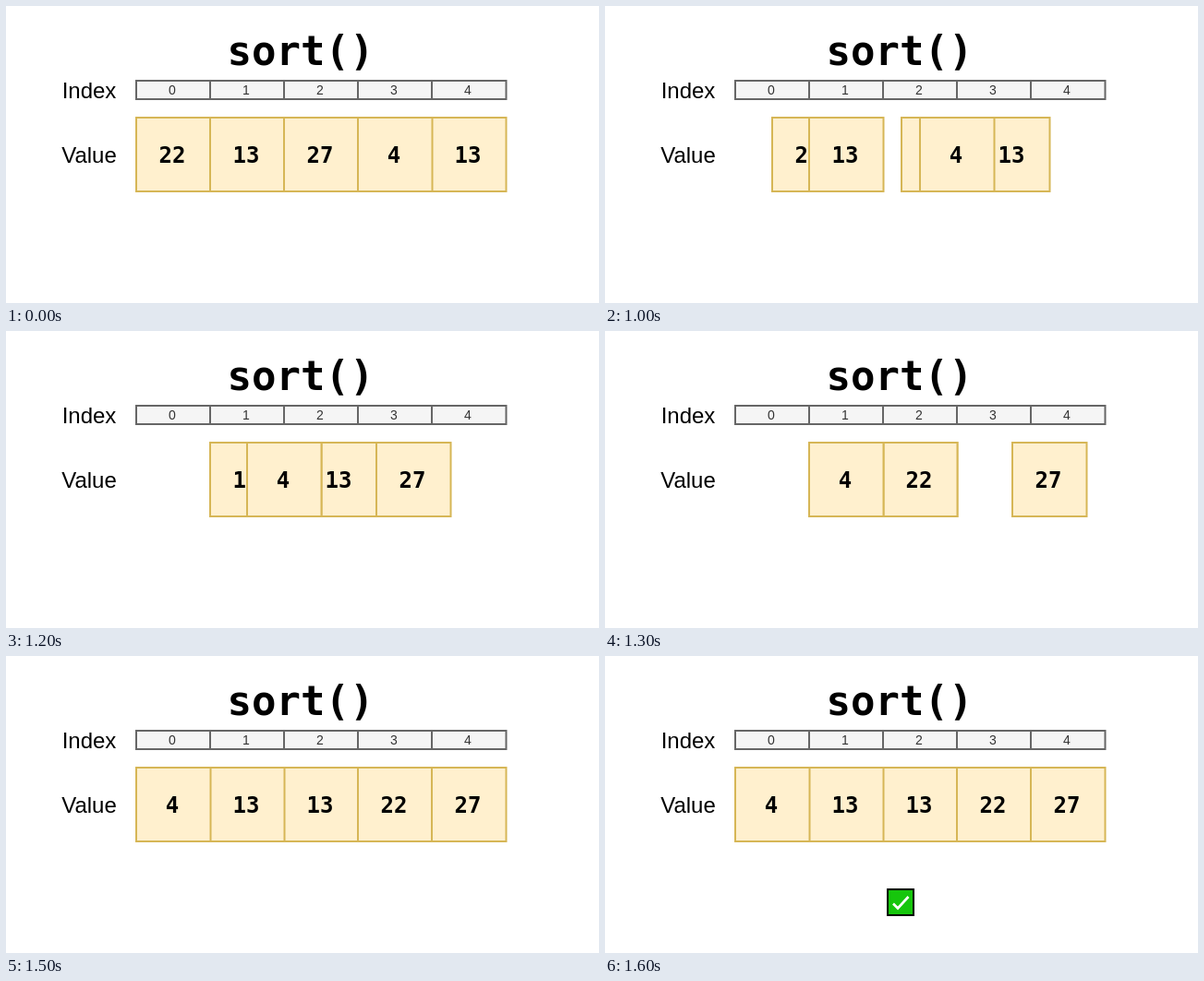
Write an HTML page that moves like this. It is 642 px wide and 322 px high and loops after 3.6 s.

```html
<!DOCTYPE html>
<html lang="en">
<head>
<meta charset="utf-8">
<title>sort()</title>
<style>
  html, body { margin: 0; width: 100%; height: 100%; overflow: hidden; background: #fff; }
  svg { display: block; width: 100%; height: 100%; }
  text { text-anchor: middle; font-family: "Liberation Sans", Arial, sans-serif; }
  .title, .value { font-family: "DejaVu Sans Mono", monospace; font-weight: bold; }
  .title { font-size: 44px; }
  .value { font-size: 24px; }
  .label { font-size: 24px; }
  .index { font-size: 14px; fill: #333; }
  rect { stroke-width: 2; }
  .slot { fill: #f5f5f5; stroke: #666; }
  .card { fill: #fff0ce; stroke: #d6b656; }
</style>
</head>
<body>
<svg viewBox="0 0 642 322">
  <text class="title" x="319" y="64">sort()</text>
  <text class="label" x="90" y="100">Index</text>
  <text class="label" x="90" y="170">Value</text>
  <g id="slots"></g>
  <g id="cards"></g>
  <g id="check">
    <rect x="306" y="253" width="28" height="28" fill="#16c60c" stroke="#000"/>
    <path d="M312 268.5 L317 273.5 L328.5 261" fill="none" stroke="#fff" stroke-width="2.6"/>
  </g>
</svg>
<script>
const LOOP = 3600, START = 900, STEP = 100, STEPS = 6, CHECK_AT = 1600;
const LEFT = 141, CELL = 80, SPEED = 40;

// Listed from back to front; lead shifts a card ahead of or behind the others.
const cards = [
  { value: 13, from: 4, to: 2, lead: 20 },
  { value: 22, from: 0, to: 3, lead: 0 },
  { value: 13, from: 1, to: 1, lead: 0 },
  { value: 27, from: 2, to: 4, lead: -20 },
  { value: 4, from: 3, to: 0, lead: 0 }
];

const byId = id => document.getElementById(id);

function addNode(parent, tag, attrs, text = "") {
  const node = document.createElementNS("http://www.w3.org/2000/svg", tag);
  for (const key in attrs) node.setAttribute(key, attrs[key]);
  node.textContent = text;
  return parent.appendChild(node);
}

function addCell(parent, y, height, boxClass, textClass, baseline, label) {
  const group = addNode(parent, "g", {});
  addNode(group, "rect", { class: boxClass, x: 0, y, width: CELL + 0.5, height });
  addNode(group, "text", { class: textClass, x: 39, y: baseline }, label);
  return group;
}

function place(node, x) {
  node.setAttribute("transform", `translate(${x} 0)`);
}

for (let i = 0; i < 5; i++) {
  place(addCell(byId("slots"), 81, 20, "slot", "index", 96, i), LEFT + i * CELL);
}
for (const card of cards) {
  card.node = addCell(byId("cards"), 121, 80, "card", "value", 170, card.value);
}

function cardX({ from, to, lead }, step) {
  const distance = Math.abs(to - from) * CELL;
  const moved = step ? Math.min(distance, SPEED * step + lead) : 0;
  return LEFT + from * CELL + Math.sign(to - from) * moved;
}

function draw(time) {
  const step = Math.max(0, Math.min(STEPS, Math.floor((time - START) / STEP)));
  for (const card of cards) place(card.node, cardX(card, step));
  byId("check").style.display = time >= CHECK_AT ? "" : "none";
}

let begin;
function tick(now) {
  begin ??= now;
  draw((now - begin) % LOOP);
  requestAnimationFrame(tick);
}
draw(0);
requestAnimationFrame(tick);
</script>
</body>
</html>
```
